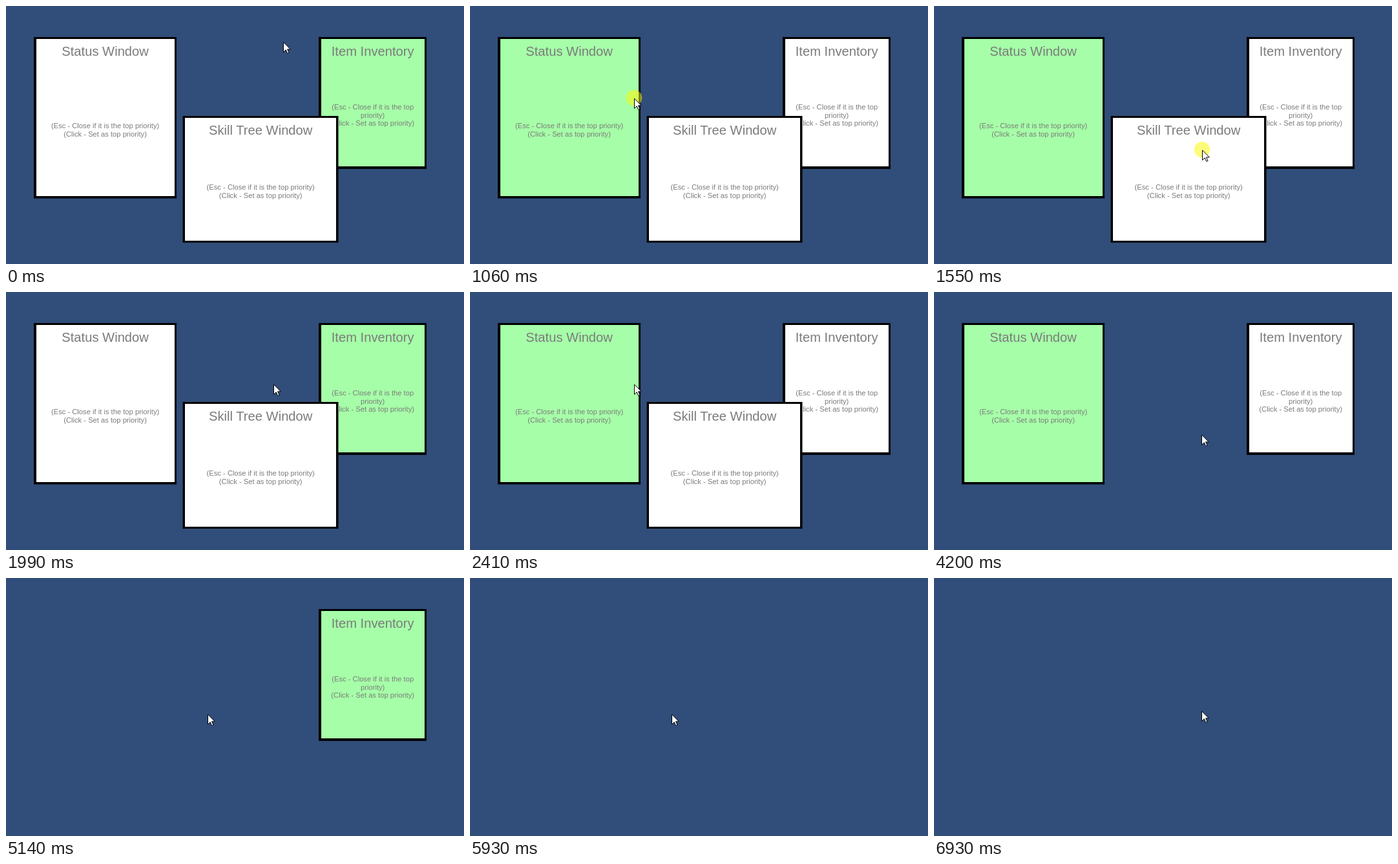
Recreate the animation shown at these times as an HTML page. Size 709 by 399 pixels, loop 7.22 s.

```html
<!DOCTYPE html>
<html lang="en">
<head>
<meta charset="utf-8">
<title>Window priority demo</title>
<style>
  html, body { margin: 0; width: 100%; height: 100%; overflow: hidden; background: #314d79; }
  svg { display: block; width: 709px; height: 399px; }
  .pane { fill: #fff; }
  .top .pane { fill: #a6ffa8; }
  text { font-family: "Liberation Sans", Arial, sans-serif; font-size: 11.2px; text-anchor: middle; fill: #7b7b7b; }
  .title { font-size: 20.2px; }
</style>
</head>
<body>
<svg viewBox="0 0 709 399">
  <g id="status">
    <rect x="43" y="48" width="221" height="249.5"/>
    <rect class="pane" x="47" y="51" width="214" height="243"/>
    <text class="title" x="153.6" y="77">Status Window</text>
    <text x="153.6" y="188.6">(Esc - Close if it is the top priority)</text>
    <text x="153.6" y="201.5">(Click - Set as top priority)</text>
  </g>
  <g id="item">
    <rect x="484" y="48" width="167" height="204"/>
    <rect class="pane" x="488" y="51" width="160" height="197"/>
    <text class="title" x="567.7" y="77">Item Inventory</text>
    <text x="567.7" y="159.6">(Esc - Close if it is the top</text>
    <text x="567.7" y="172.5">priority)</text>
    <text x="567.7" y="185.4">(Click - Set as top priority)</text>
  </g>
  <g id="skill">
    <rect x="273.6" y="170" width="240.9" height="196"/>
    <rect class="pane" x="277" y="173" width="234" height="190"/>
    <text class="title" x="394.2" y="198.7">Skill Tree Window</text>
    <text x="394.2" y="284.1">(Esc - Close if it is the top priority)</text>
    <text x="394.2" y="297">(Click - Set as top priority)</text>
  </g>
  <g id="cursor">
    <circle id="press" r="12.3" fill="#fff700" fill-opacity=".52"/>
    <path d="M.5 1V16.4L4.2 12.8 6.7 18.4 9 17.4 6.6 11.9H11.3Z" fill="#fff" stroke="#000"/>
  </g>
</svg>
<script>
const LOOP = 7220, STEP = 70;
const RAISE = 2 * STEP, RELEASE = 3 * STEP; // delays after a press

// Pointer moves, with an optional click on arrival, and Esc presses
const story = [
  { at: 500, until: 710, to: [445, 148] },
  { at: 780, until: 920, to: [254, 142], click: 'status' },
  { at: 1270, until: 1480, to: [415, 222], click: 'skill' },
  { at: 1630, until: 1700, to: [505, 138], click: 'item' },
  { at: 1910, until: 1980, to: [414, 142] },
  { at: 2060, until: 2130, to: [254, 142], click: 'status' },
  { at: 2630, until: 2770, to: [414, 220], click: 'skill' },
  { at: 4200, esc: true },
  { at: 4850, until: 4920, to: [312, 210] },
  { at: 5140, esc: true },
  { at: 5930, esc: true },
  { at: 6790, until: 6930, to: [414, 205] }
];

const el = id => document.getElementById(id);
const show = (id, on) => el(id).style.display = on ? '' : 'none';
const smooth = p => p * p * (3 - 2 * p);

function progress({ at, until }, t) {
  const steps = (until - at) / STEP + 1;
  return smooth(Math.min(1, (Math.floor((t - at) / STEP) + 1) / steps));
}

function stateAt(t) {
  let pos = [429, 55], open = ['skill', 'status', 'item'], pressed = false;
  for (const act of story) {
    if (t < act.at) break;
    if (act.esc) open.pop();
    if (act.to) {
      const p = progress(act, t);
      pos = pos.map((v, i) => v + (act.to[i] - v) * p);
    }
    if (act.click) {
      const held = t - act.until;
      pressed = held >= 0 && held < RELEASE;
      if (held >= RAISE) open = [...open.filter(id => id !== act.click), act.click];
    }
  }
  return { pos, open, pressed };
}

function tick() {
  const { pos, open, pressed } = stateAt(performance.now() % LOOP);
  for (const id of ['status', 'item', 'skill']) {
    show(id, open.includes(id));
    el(id).classList.toggle('top', id === open.at(-1));
  }
  el('cursor').setAttribute('transform', `translate(${pos.map(Math.round)})`);
  show('press', pressed);
  requestAnimationFrame(tick);
}
tick();
</script>
</body>
</html>
```
